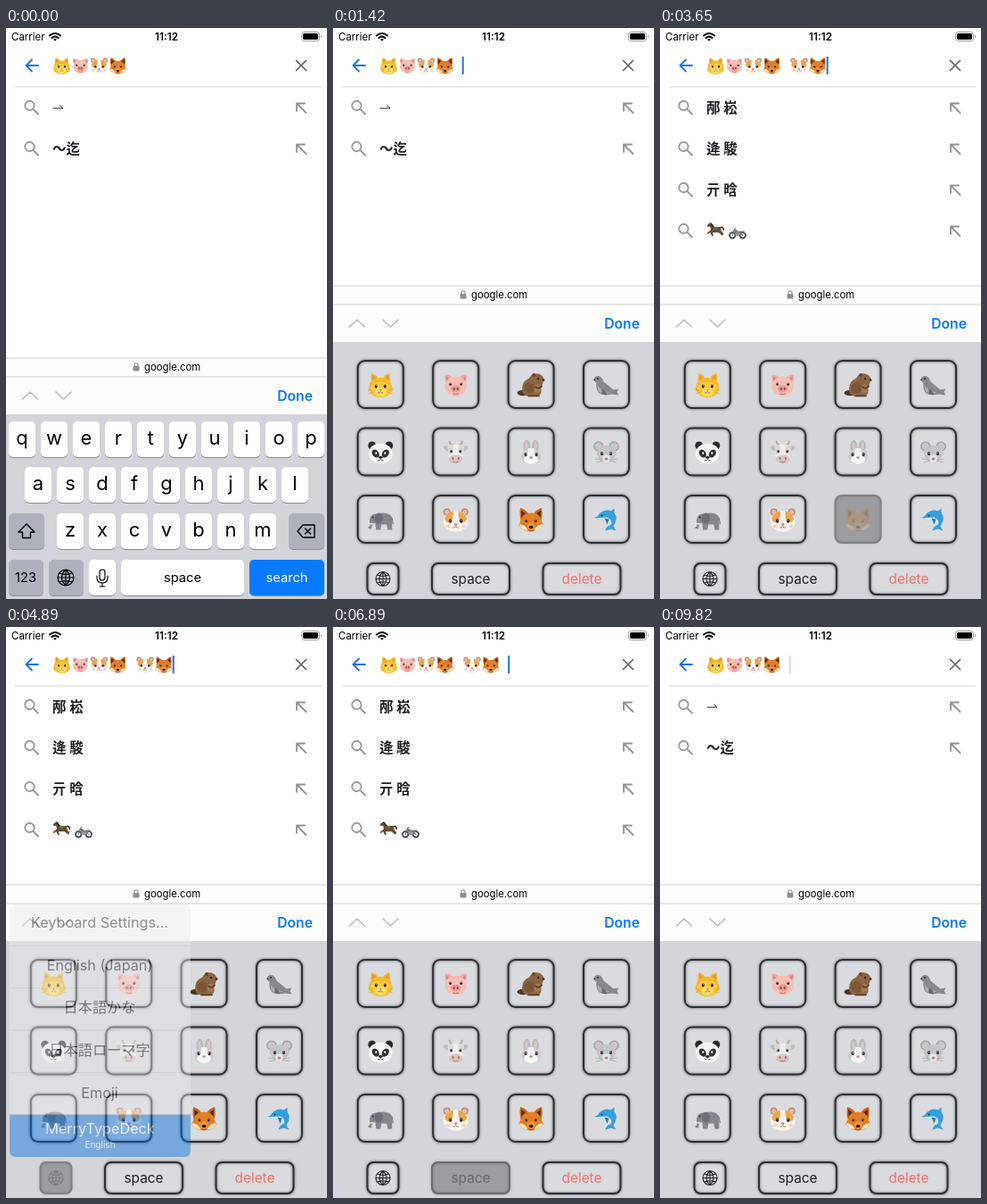
Write an HTML page that moves like this. It is 360x640 px and loops after 9.9 s.

```html
<!DOCTYPE html>
<html lang="ja">
<head>
<meta charset="utf-8">
<title>Animal keyboard</title>
<style>
html, body { margin: 0; width: 100%; height: 100%; overflow: hidden; background: #fff; }
svg { display: block; width: 360px; height: 640px; font-family: Inter, "Noto Sans CJK JP", sans-serif; }
.mid { text-anchor: middle; }
.line { fill: none; stroke: currentColor; stroke-linecap: round; stroke-linejoin: round; }
.frame { stroke: #2f3033; stroke-width: 2; filter: drop-shadow(0 0 1.5px #0009); }
</style>
</head>
<body>
<svg id="stage" viewBox="0 0 360 640"></svg>
<script>
const LOOP = 9900;
const at = (x, y, body, scale = 1) => `<g transform="translate(${x} ${y}) scale(${scale})">${body}</g>`;
const text = (x, y, size, body, attrs = '') => `<text x="${x}" y="${y}" font-size="${size}" ${attrs}>${body}</text>`;
const rect = (x, y, w, h, fill, r = 0, attrs = '') =>
  `<rect x="${x}" y="${y}" width="${w}" height="${h}" rx="${r}" fill="${fill}" ${attrs}/>`;
const oval = (x, y, rx, ry, fill) => `<ellipse cx="${x}" cy="${y}" rx="${rx}" ry="${ry}" fill="${fill}"/>`;
const shape = (d, fill) => `<path d="${d}" fill="${fill}"/>`;
const line = (d, color, width = 1.5) => `<path class="line" d="${d}" style="color:${color};stroke-width:${width}"/>`;
const both = body => body + `<g transform="scale(-1 1)">${body}</g>`;
const eyes = (x, y, r = 1.5) => both(oval(x, y, r, r * 1.3, '#2b201b') + oval(x - .3, y - .7, .5, .5, '#fff'));

// Animals, drawn around 0,0 within about 28 units
const animals = {
  cat: shape('M-13.500 5Q-12.500-2-10.500-5Q-11.500-11-9.500-13.500Q-5-12-3-8.500Q0-9 3-8.500Q5-12 9.500-13.500Q11.500-11 10.500-5Q12.500-2 13.500 5Q10 13.500 0 13.500Q-10 13.500-13.500 5Z', '#f3b92a') +
    both(shape('M5-8.500L9-11.500L9.500-5.500Z', '#dc9a3a')) + oval(0, 4.5, 11.5, 8.5, '#fbcb3e') + oval(0, 7.5, 6, 4.5, '#fddd73') +
    eyes(5, 1, 1.5) + shape('M-1.700 4.500H1.700L0 6.300Z', '#c9705f') + line('M-2.500 8.500Q-1 9 0 7Q1 9 2.500 8.500', '#8b5a1c', .8) +
    both(line('M8 6L13 5M8 8L13 9', '#c9931c', .6)),
  pig: both(shape('M2-7Q7-13 12-11.500Q13-5 10-2Z', '#f0a9a3') + shape('M7-7L11-10L10-4Z', '#d07f7b')) +
    oval(0, 1, 12.3, 10.8, '#f7beb5') + oval(0, 4, 5.5, 4, '#ec9b94') + both(oval(2, 4, 1.1, 1.8, '#93494a')) +
    eyes(6, -1.2, 1.4) + line('M-3 9.500Q0 11 3 9.500', '#a95c58', .8),
  beaver: oval(-9, 8.5, 6.5, 3.2, '#4d3527') +
    shape('M-10 4Q-10-5-2-8Q1-14 8-13Q15-11 14-5Q13-1 11 2Q13 10 8 12H-4Q-10 11-10 4Z', '#8b6543') +
    oval(-2, 3, 6, 6.5, '#7b5638') + oval(7, 4, 3.5, 5, '#a17a52') + oval(3, -11.5, 2, 2, '#69462d') +
    oval(8, -7.5, 1, 1.2, '#20150f') + oval(14, -6, 1.4, 1.2, '#3b271b') + line('M5 2Q9 5 12 1', '#5c3e28', 1.8) + line('M-3 12H9', '#4d3120', 1.6),
  seal: shape('M-14-7Q-12-12-7-10Q-4-8-3-4Q2 0 8 5L14 4L12 7.500L14 11L6 10Q-4 12-9 8Q-12 3-11-3Q-14-4-14-7Z', '#85888d') +
    shape('M-10 0Q-6 6 4 8Q-4 11-9 7Z', '#a8abaf') + shape('M-5 4Q1 7 0 11L-5 10Z', '#666a70') +
    oval(-9.5, -7.5, .9, 1, '#222') + oval(-13.3, -6.3, 1, .8, '#333'),
  panda: both(oval(9.5, -8, 4.5, 4.5, '#29292b')) + oval(0, 1, 13.3, 11.5, '#f4f4f3') +
    both(`<g transform="rotate(35 5.5 1)">${oval(5.5, 1, 3.6, 5, '#333335')}</g>` + oval(5, .5, 1, 1.2, '#fff')) +
    oval(0, 5.3, 2.2, 1.5, '#222') + line('M-3 8.500Q-1 9.500 0 7.500Q1 9.500 3 8.500', '#444', .8),
  cow: both(line('M5-9Q7-10 7-12.500', '#b9ac98', 2.2) + shape('M6-6Q12-10 14-6Q12-1 7-2Z', '#c3bfbc')) +
    shape('M-9-7Q0-12 9-7L8 4Q8 12.500 0 12.500Q-8 12.500-8 4Z', '#efeeec') + both(shape('M3-9Q8-9 9-6L8 2Q3 2 3-3Z', '#dad7d4')) +
    oval(0, 7.5, 8, 5, '#dcc5bf') + both(oval(3.2, 6.5, 1, 1.4, '#8f706a')) + eyes(5, -1.5, 1.3) + line('M-3 10Q0 11.500 3 10', '#8f706a', .8),
  rabbit: both(shape('M1-2Q0-14 5-14.500Q10-13 8-1Z', '#b9b9bc') + shape('M3.500-4Q3-11 5.200-12.500Q8-10 6-3Z', '#dcc6c5')) +
    shape('M-11 5Q-10-5 0-5Q10-5 11 5Q9 13.500 0 13.500Q-9 13.500-11 5Z', '#cbcbce') + shape('M-3-5H3L5 4Q8 13 0 13Q-8 13-5 4Z', '#f0f0f0') +
    both(oval(3.5, 8, 4.5, 3.8, '#f6f6f6')) + eyes(6, 2, 1.6) + oval(0, 5.5, 1.8, 1.2, '#c98586') + rect(-1.3, 9.5, 2.6, 3, '#fff', .5),
  mouse: both(oval(8.7, -7, 5.8, 5.8, '#a2a4a8') + oval(8.7, -7, 4.3, 4.3, '#cfc5c4')) +
    shape('M-11 1Q-10-8 0-8Q10-8 11 1Q8 9 0 13Q-8 9-11 1Z', '#c2c4c7') + oval(0, 7, 4.5, 4.8, '#e6e6e7') + eyes(5, 1) +
    oval(0, 7, 2, 1.6, '#b98384') + both(line('M4 8L12 7M4 9L11 11', '#999', .6)),
  elephant: shape('M-4-7Q9-10 13-3L13 11H8L7 5H1L0 11H-5L-6 3Q-10 4-10 9Q-10 11-14 9Q-14 7-12 7Q-14-8-4-7Z', '#83878c') +
    oval(-2, -2, 4.6, 6, '#6d7177') + oval(-8.5, -3, .9, 1, '#222') + line('M-9 4Q-12 5-14 3', '#f3efe2', 1.4) + line('M13-2L14 4', '#6d7177', 1),
  hamster: both(oval(10, -9, 4, 4, '#b78a79') + oval(10, -9, 2.6, 2.6, '#eab7ab')) + oval(0, 1.5, 14, 11.8, '#f8f3ec') +
    both(shape('M3-10Q10-9 12.500-2Q11 4 6 2Q2-2 3-10Z', '#e9a64c')) + eyes(6, 1, 1.7) + oval(0, 5, 1.8, 1.3, '#d9767c') +
    both(oval(9, 7, 2.5, 1.7, '#f3cdc2')) + line('M-3 8.500Q-1 9.500 0 7Q1 9.500 3 8.500', '#8d6252', .8),
  fox: both(shape('M2-6Q7-13 12-13.500Q13.500-6 11 2Z', '#c9651a') + shape('M6.500-7.500L11-11L10.500-3Z', '#4f2c1c')) +
    shape('M-10-3Q-6-8 0-8Q6-8 10-3Q12 2 14 6Q9 12 4 12Q0 14-4 12Q-9 12-14 6Q-12 2-10-3Z', '#e27f22') +
    both(shape('M4 11.500Q5 6 12.500 4.500L13.500 6Q9 12 4 11.500Z', '#f8e4c6')) + oval(0, 7.5, 4.5, 5, '#eb9440') +
    eyes(5.2, 1, 1.4) + oval(0, 8, 2.4, 1.8, '#2b201b') + line('M-2.500 11.500Q0 12.500 2.500 11.500', '#77442b', .8),
  dolphin: shape('M-13-3Q-9-4-8-7Q-1-13 5-10L9-13L9-8Q14-2 8 7L11 12L5 10L-1 12Q0 7 4 6Q7 1 0-1Q-5 1-10-1Z', '#339fdb') +
    shape('M-12-2Q-4-3 1-3Q8 0 5 6Q5 1-1-.500Q-6 1-10-1Z', '#d2ebf6') + shape('M-2-2L1 5L3-1Z', '#2479b5') + oval(-5, -5, .9, 1, '#172b3c'),
  horse: shape('M-13-8L-8-12L-5-8L-1-5L7-6Q10-4 9 0L13 5L11 8L5 3L-4 3L-3 8L-5 9L-8 3L-12 6L-13 4L-7-1L-8-6L-12-6Z', '#6b4a30') +
    line('M-7-11L-3-6M9-5Q12-6 13-1', '#2c2018', 2.2) + shape('M-3-6H4L3-1H-2Z', '#4a7a50'),
  bike: both(`<circle class="line" cx="8" cy="6" r="4.500" style="color:#3f4246;stroke-width:2.400"/>`) +
    line('M-8 6L-5-3L-3-5M8 6L3 2', '#70757a', 1.8) + shape('M-6-2Q-2-4 1 0L11-1L8 2L3 6H-3Z', '#73787e') + oval(0, 4, 4, 3, '#94979b'),
};

const globe = color => line('M-8 0A8 8 0 1 0 8 0A8 8 0 1 0-8 0H8M0-8V8M0-8Q-8 0 0 8Q8 0 0-8M-6.3-4.5Q0-2 6.3-4.5M-6.3 4.5Q0 2 6.3 4.5', color, 1.1);

function statusBar() {
  return text(6, 14, 11.5, 'Carrier') + text(180, 14, 11.7, '11:12', 'class="mid" font-weight="600"') +
    at(55, 14, line('M-6-5.5Q0-10.5 6-5.5M-3.6-2.9Q0-5.8 3.6-2.9', '#000', 2) + shape('M0 .7L-2-1.2Q0-2.8 2-1.2Z', '#000')) +
    rect(331.5, 4.5, 20, 10, 'none', 3, 'stroke="#999"') + rect(333, 6, 17, 7, '#000', 1.7) + shape('M353 7.5Q355 9.5 353 11.5Z', '#999');
}

function searchBar() {
  return line('M36 42H22.5M29 35.5L22.5 42L29 48.5', '#1a73e8', 1.8) +
    line('M325.5 36.5L336.5 47.5M336.5 36.5L325.5 47.5', '#5f6368', 1.7) + rect(10, 65.5, 344, 1, '#d5d7da');
}

function suggestion(index, body) {
  return at(0, 89 + index * 46, `<circle class="line" cx="26.5" cy="-2" r="5.2" style="color:#989b9f;stroke-width:1.9"/>` +
    line('M30.5 2L36 7.5', '#989b9f', 2) + line('M326 4V-4.5H335M326-4.5L336.5 6', '#8f9296', 1.8) + body);
}
const boldWord = word => text(52, 5.5, 15.5, word, 'font-weight="700" fill="#202124"');
const shortList = suggestion(0, line('M53 1H64L60.5-2', '#202124', 1)) + suggestion(1, boldWord('～迄'));
const longList = ['邴 崧', '逄 駿', '亓 晗'].map((name, i) => suggestion(i, boldWord(name))).join('') +
  suggestion(3, at(62, 0, animals.horse, .72) + at(87, 1, animals.bike, .72));

function accessoryBar() {
  return rect(0, 288, 360, 64, '#fdfdfd') + rect(0, 288.5, 360, 1, '#d4d4d6') + rect(0, 309.5, 360, 1, '#d4d4d6') +
    rect(142.5, 298, 7, 5.5, '#8e8e93', 1) + line('M144 298V296Q146 293 148 296V298', '#8e8e93', 1.2) +
    text(155, 303, 11.3, 'google.com') +
    line('M18.5 335L27 327L35.5 335M56 327L64.5 335L73 327', '#bcbcc0', 1.6) +
    text(344, 337, 15.7, 'Done', 'text-anchor="end" font-weight="600" fill="#087aff"');
}

function letterKeyboard() {
  const key = (x, y, w, fill, body) => rect(x, y + 1, w, 40, '#8b8d92', 5) + rect(x, y, w, 40, fill, 5) + body;
  const rows = [['qwertyuiop', 18, 441], ['asdfghjkl', 36, 492], ['zxcvbnm', 72, 544]];
  const letters = rows.map(([word, left, y]) => [...word].map((c, i) => {
    const x = left + i * 36;
    return key(x - 15, y, 30, '#fff', text(x, y + 26, 22, c, 'class="mid"'));
  }).join('')).join('');
  const label = (x, word, color = '#000') => text(x, 621, 14.7, word, `class="mid" fill="${color}"`);
  const dark = '#adb2bc';
  return rect(0, 433, 360, 207, '#d2d4da') + letters +
    key(3, 544, 40, dark, at(23, 564, line('M0-8L9 1H4.5V7.5H-4.5V1H-9Z', '#000', 1.4))) +
    key(317, 544, 40, dark, at(337, 564, line('M-10 0L-4-7H9V7H-4ZM-1.5-3L4.5 3M4.5-3L-1.5 3', '#000', 1.4))) +
    key(3, 596, 39, dark, label(22, '123')) + key(48, 596, 39, dark, at(67, 616, globe('#000'), 1.12)) +
    key(93, 596, 30, '#fff', at(108, 616, line('M-3-6Q-3-9 0-9Q3-9 3-6V0Q3 3 0 3Q-3 3-3 0ZM-6-2V0Q-6 6 0 6Q6 6 6 0V-2M0 6V10M-3 10H3', '#000', 1.2))) +
    key(129, 596, 138, '#fff', label(198, 'space')) + key(273, 596, 84, '#087aff', label(315, 'search', '#fff'));
}

function animalKeyboard() {
  const key = (id, x, y, w, h, r, body) => rect(x, y, w, h, '#dadbde', r) +
    rect(x - 1, y - 1, w + 2, h + 2, '#9b9c9f', r, `id="${id}-shade" opacity="0"`) +
    `<g id="${id}">` + rect(x, y, w, h, 'none', r, 'class="frame"') + body + '</g>';
  const names = ['cat', 'pig', 'beaver', 'seal', 'panda', 'cow', 'rabbit', 'mouse', 'elephant', 'hamster', 'fox', 'dolphin'];
  const keys = names.map((name, i) => {
    const x = 53.3 + i % 4 * 84.4, y = 399.5 + Math.floor(i / 4) * 75.5;
    return key(name, x - 25.5, y - 26.5, 51, 53, 8, at(x, y + 1, animals[name]));
  }).join('');
  const word = (x, label, color) => text(x, 623, 15.4, label, `class="mid" fill="${color}"`);
  return rect(0, 352, 360, 288, '#d4d5d9') + keys +
    key('globe', 38.5, 600, 35, 35, 7, at(56, 617.5, globe('#222'))) +
    key('space', 111, 600, 87, 35, 7, word(154.5, 'space', '#222')) +
    key('delete', 235.5, 600, 87, 35, 7, word(279, 'delete', '#f86f68'));
}

function languageMenu() {
  const rows = ['Keyboard Settings...', 'English (Japan)', '日本語かな', '日本語ローマ字', 'Emoji'];
  return rect(4, 310, 203, 284, '#e9eaec', 7) + shape('M4 546H207V587Q207 594 200 594H11Q4 594 4 587Z', '#0070e0') +
    rows.map((row, i) => text(105, 337 + i * 47.7, 16.2, row, 'class="mid"') +
      rect(4, 357 + i * 47.3, 203, .7, '#bbbcc0')).join('') +
    text(105.5, 568, 16.2, 'MerryTypeDeck', 'class="mid" fill="#fff"') +
    text(105.5, 584, 10, 'English', 'class="mid" fill="#fff"');
}

const typed = ['cat', 'pig', 'hamster', 'fox', ' ', 'hamster', 'fox', ' '];
const LEFT = 52.2;
const advance = glyph => glyph === ' ' ? 9.5 : 21;
const penAt = count => typed.slice(0, count).reduce((x, glyph) => x + advance(glyph), LEFT);
const glyphs = typed.map((glyph, i) =>
  `<g id="glyph${i}">${glyph === ' ' ? '' : at(penAt(i) + 10.3, 42.5, animals[glyph], .69)}</g>`).join('');

document.getElementById('stage').innerHTML = rect(0, 0, 360, 640, '#fff') + statusBar() + searchBar() + glyphs +
  rect(-1, 32, 2, 20, '#1a73e8', 0, 'id="caret"') + `<g id="short">${shortList}</g><g id="long">${longList}</g>` +
  `<g id="accessory">${accessoryBar()}</g><g id="letters">${letterKeyboard()}</g>` +
  `<g id="animals">${animalKeyboard()}</g><g id="menu">${languageMenu()}</g>`;

const el = id => document.getElementById(id);
const show = (id, on) => el(id).style.display = on ? '' : 'none';
const fade = (id, alpha) => el(id).setAttribute('opacity', alpha);

// Caret toggles: off, on, off, on ...
const blinks = [700, 1060, 1720, 2080, 2740, 3080, 4080, 4520, 5200, 5530, 6230, 6540, 7250, 7510, 8520, 9040, 9700];
const taps = { hamster: [3190], fox: [3650], space: [6780], delete: [7510, 7860, 8200] };
const stepAt = (t, steps) => steps.reduce((value, [time, next]) => t >= time ? next : value, 0);

function caretAlpha(t) {
  if (t < 120) return 0;
  const past = blinks.filter(time => time <= t);
  if (past.length && t - past.at(-1) < 115) return .6;
  return past.length % 2 ? .25 : 1;
}

function press(id, amount) {
  fade(id + '-shade', Math.min(1, amount * 1.3));
  fade(id, 1 - .76 * amount);
}

function draw(t) {
  const custom = t >= 1420;
  show('letters', !custom);
  show('animals', custom);
  el('accessory').setAttribute('transform', `translate(0 ${custom ? 0 : 81})`);

  const done = times => times.filter(s => s <= t).length;
  const count = 5 + done([3190, 3650, 6780]) - done(taps.delete);
  typed.forEach((_, i) => show('glyph' + i, i < count));
  el('caret').setAttribute('transform', `translate(${penAt(count)} 0)`);
  fade('caret', caretAlpha(t));

  const expanded = t >= 3420 && t < 8090;
  show('short', !expanded);
  show('long', expanded);

  for (const id in taps) {
    const start = taps[id].filter(s => s <= t).at(-1);
    press(id, [1, .75, .4][Math.floor((t - start) / 110)] || 0);
  }
  press('globe', stepAt(t, [[4520, .5], [4640, 1], [5640, .6], [5750, .25], [5860, 0]]));
  fade('menu', stepAt(t, [[4890, .44], [5200, 1], [5640, .6], [5750, .25], [5860, 0]]));
}

function tick() {
  draw(performance.now() % LOOP);
  requestAnimationFrame(tick);
}
tick();
</script>
</body>
</html>
```
